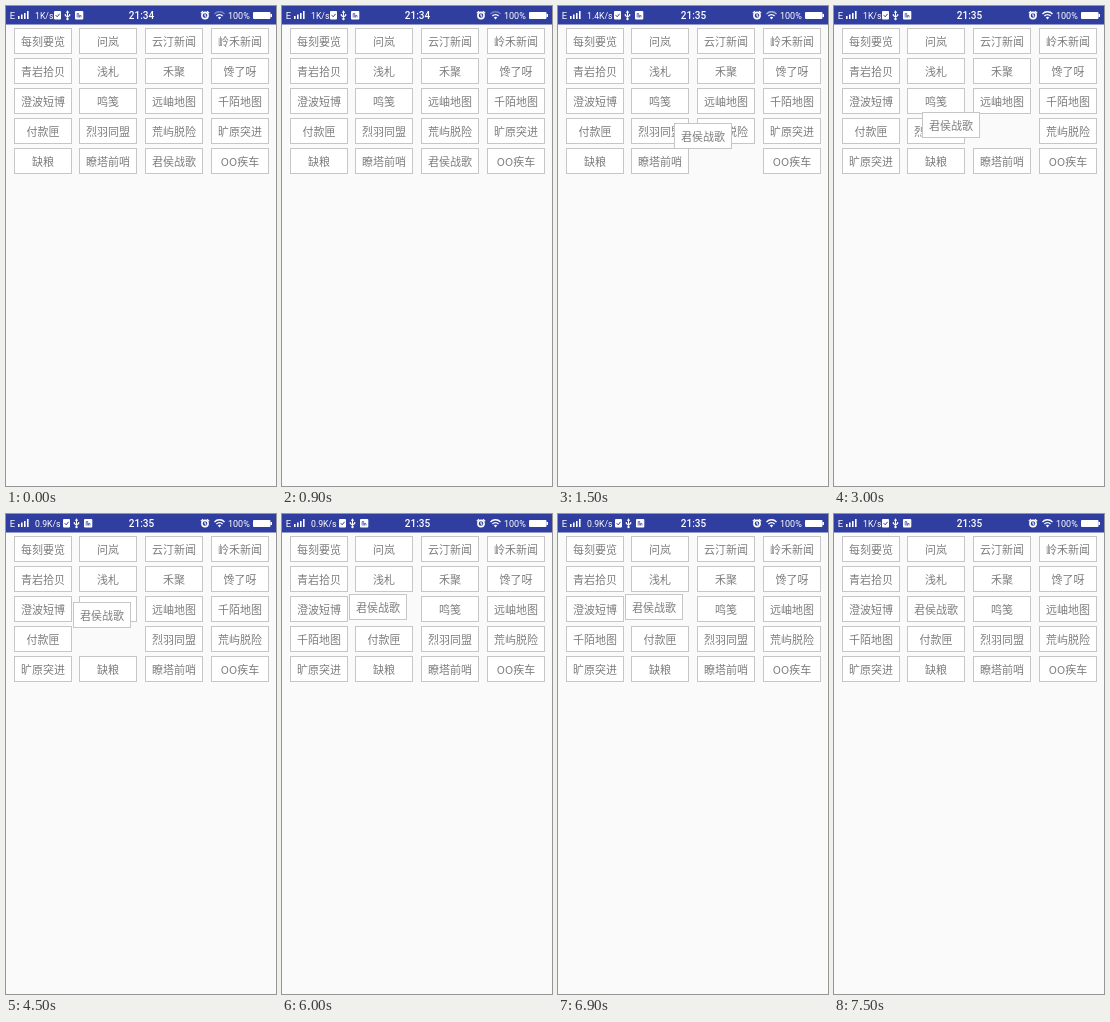
Write an HTML page that moves like this. It is 270x480 px and loops after 9000 ms.

```html
<!DOCTYPE html>
<html lang="zh-CN">
<head>
<meta charset="utf-8">
<title>Drag to reorder</title>
<style>
  html, body { margin: 0; width: 100%; height: 100%; overflow: hidden; background: #fafafa; }
  svg { display: block; width: 100%; height: 100%; }
  .cell rect { fill: #fff; stroke: #c6c6c6; }
  .cell text { font: 11px "Noto Sans CJK SC", "Noto Sans CJK", sans-serif; fill: #7d7d7d; text-anchor: middle; }
  .bar { font-family: Roboto, sans-serif; fill: #fff; }
  .line { fill: none; stroke: #fff; }
</style>
</head>
<body>
<svg viewBox="0 0 270 480">
  <rect width="270" height="480" fill="#fafafa"/>
  <rect width="270" height="18.5" fill="#303f9f"/>
  <g class="bar">
    <text x="3.7" y="13" font-size="9.5">E</text>
    <path d="M12 13v-3h1.6v3zM15 13v-4.5h1.6v4.5zM18 13v-6h1.6v6zM21 13v-8h1.6v8z"/>
    <text id="speed" x="29" y="13" font-size="8.7"></text>
    <g id="notices">
      <rect x="48" y="5" width="7" height="8.5" rx="1"/>
      <path d="M49.7 9.2l1.5 1.6 2.4-3" fill="none" stroke="#303f9f"/>
      <path class="line" d="M61.5 5.5v8M59.3 8v1.5l2.2 1.5 2.2-1.5V8" stroke-width="1.1"/>
      <path d="M59.8 6.7l1.7-2.4 1.7 2.4z"/>
      <circle cx="61.5" cy="13" r="1.2"/>
      <rect x="69" y="5" width="8.3" height="8.5" rx="1"/>
      <path d="M71.2 11.5V7.5h1.5v4M73.5 11.5v-2H75v2" fill="none" stroke="#303f9f" stroke-width=".7"/>
    </g>
    <text id="clock" x="135.5" y="13" font-size="10" font-weight="500" text-anchor="middle"></text>
    <g class="line">
      <circle cx="199" cy="9.5" r="3.1" stroke-width="1.6"/>
      <path d="M199 7.8v1.9l1.3.7M194.8 7.2l2.2-2M203.2 7.2l-2.2-2" stroke-width="1.1"/>
      <path id="outerWave" d="M208.5 8a6.7 6.7 0 0 1 10 0" stroke-width="1.3"/>
      <path d="M210.4 10a4.2 4.2 0 0 1 6.2 0" stroke-width="1.3"/>
    </g>
    <path d="M213.5 13.5l-1.7-2a2.5 2.5 0 0 1 3.4 0z"/>
    <text x="222" y="13" font-size="9">100%</text>
    <rect x="247" y="6" width="17.5" height="7" rx="1"/>
    <rect x="264.5" y="8" width="1.5" height="3"/>
  </g>
  <g id="grid"></g>
</svg>
<script>
const STEP = 1500;
const DRAGGED = "君侯战歌";
const labels = [
  "每刻要览", "问岚", "云汀新闻", "岭禾新闻",
  "青岩拾贝", "浅札", "禾聚", "馋了呀",
  "澄波短博", "鸣笺", "远岫地图", "千陌地图",
  "付款匣", "烈羽同盟", "荒屿脱险", "旷原突进",
  "缺粮", "瞭塔前哨", "OO疾车"
];

// slot: grid index of the dragged cell; at: its position while held
const states = [
  { slot: 18, speed: "1K/s", shift: 0, clock: "21:34", wifi: .35 },
  { slot: 18, at: [116.5, 117.5], speed: "1.4K/s", shift: 8, clock: "21:35", wifi: .6 },
  { slot: 14, at: [88.5, 106.5], speed: "1K/s", shift: 0, clock: "21:35", wifi: 1 },
  { slot: 13, at: [67.5, 88.5], speed: "0.9K/s", shift: 9, clock: "21:35", wifi: 1 },
  { slot: 9, at: [67.5, 80.5], speed: "0.9K/s", shift: 9, clock: "21:35", wifi: 1 },
  { slot: 9, speed: "1K/s", shift: 0, clock: "21:35", wifi: 1 }
];

const byId = id => document.getElementById(id);
const grid = byId("grid");

function makeCell(label) {
  const cell = document.createElementNS("http://www.w3.org/2000/svg", "g");
  cell.setAttribute("class", "cell");
  cell.innerHTML = `<rect width="57" height="25"/><text x="28.5" y="17">${label}</text>`;
  return grid.appendChild(cell);
}

const move = (node, [x, y]) => node.setAttribute("transform", `translate(${x} ${y})`);
const slotPosition = i => [8.5 + Math.floor(i % 4 * 65.7), 22.5 + Math.floor(i / 4) * 30];

const cells = labels.map(makeCell);
const dragged = makeCell(DRAGGED);
let shown = -1;

function show(index) {
  const { slot, at, speed, shift, clock, wifi } = states[index];
  cells.forEach((cell, i) => move(cell, slotPosition(i < slot ? i : i + 1)));
  move(dragged, at || slotPosition(slot));
  byId("speed").textContent = speed;
  byId("clock").textContent = clock;
  move(byId("notices"), [shift, 0]);
  byId("outerWave").setAttribute("opacity", wifi);
}

function tick() {
  const index = Math.floor(performance.now() / STEP) % states.length;
  if (index !== shown) show(shown = index);
  requestAnimationFrame(tick);
}
tick();
</script>
</body>
</html>
```
